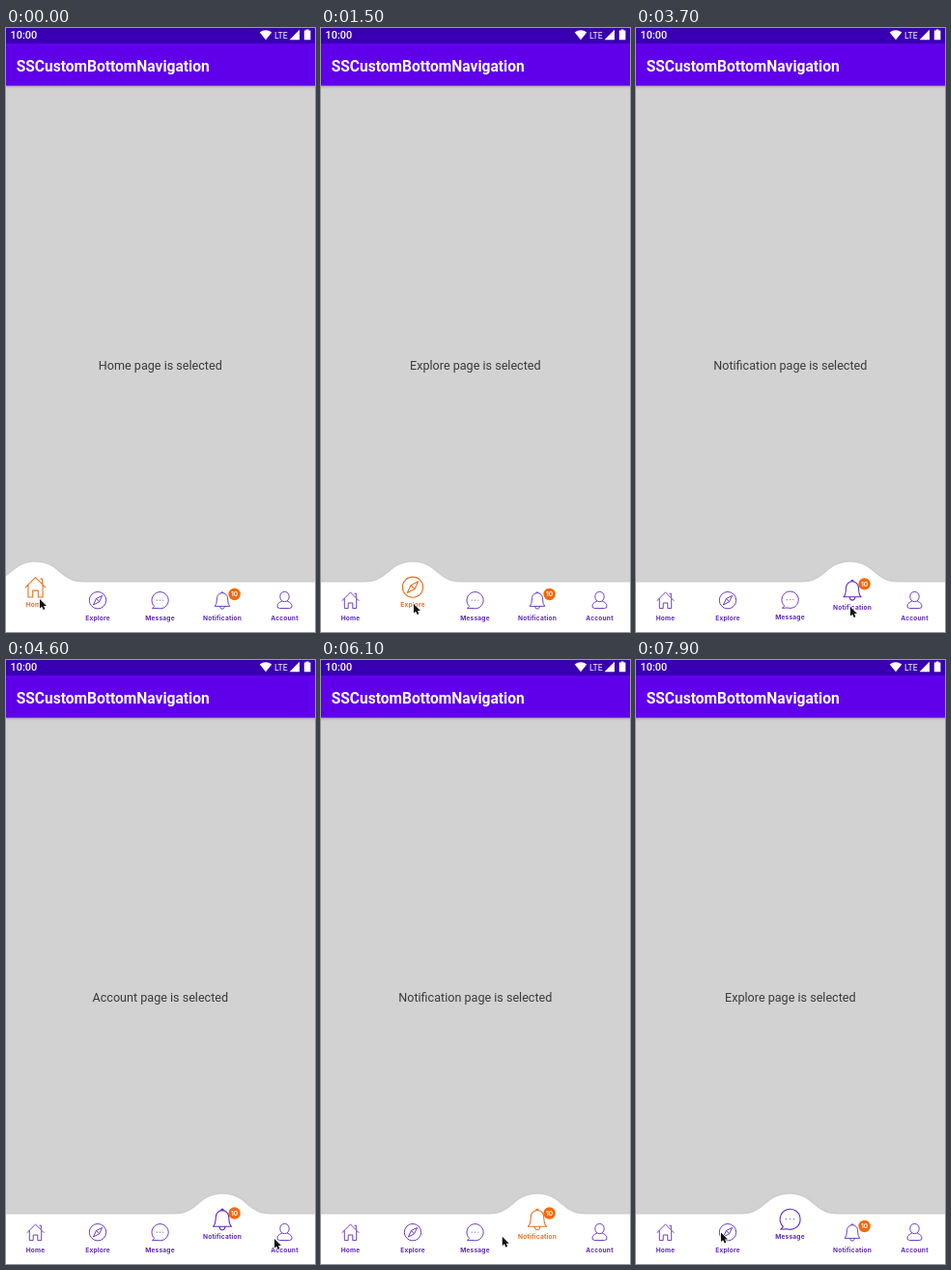
Recreate the animation shown at these times as an HTML page with a canvas. Size 320 by 624 pixels, loop 8000 ms.

```html
<!DOCTYPE html>
<html lang="en">
<head>
<meta charset="utf-8">
<title>Bottom navigation</title>
<style>
  html, body { margin: 0; width: 320px; height: 624px; overflow: hidden; }
  canvas { display: block; }
</style>
</head>
<body>
<canvas id="stage" width="320" height="624"></canvas>
<script>
const ctx = document.getElementById('stage').getContext('2d');
const LOOP = 8000, STEP = 100;
const PURPLE = '#5d2abf', ORANGE = '#ea7020';
const NAV_TOP = 572.6, WAVE_HEIGHT = 20.8, WAVE_HALF = 50, LIFT = 13.5;

// Icons are drawn around their centre
const cells = [
  { name: 'Home', icon: 'M-8.8 .6L0-8.2 8.8 .6M4-7H5.8V-2.6M-6.2-1.8V8.4H-2.3V2.8H2.3V8.4H6.2V-1.8' },
  { name: 'Explore', icon: 'M8.7 0A8.7 8.7 0 1 1-8.7 0A8.7 8.7 0 1 1 8.7 0M4.6-4.8L1.6 1.6-4.6 4.8-1.6-1.6ZM-1.6-1.6L1.6 1.6' },
  { name: 'Message', icon: 'M-5.8 6.3A8.6 8.6 0 1 1-2.6 8.2L-8 8.6ZM-3.7 0h.9M-.4 0h.9M2.9 0h.9' },
  { name: 'Notification', icon: 'M-7.8 6.2Q-5.6 4.2-5.6-1.2C-5.6-9.6 5.6-9.6 5.6-1.2Q5.6 4.2 7.8 6.2ZM-1.2-7.5Q0-10 1.2-7.5M-2.4 6.4Q-2 9 0 9T2.4 6.4' },
  { name: 'Account', icon: 'M-4.7-3.8C-4.7-10.4 4.7-10.4 4.7-3.8C4.7 3.2-4.7 3.2-4.7-3.8M-2.6 .8C-6 2.4-7.5 3.6-7.5 6Q-7.5 8.3-5 8.3H5Q7.5 8.3 7.5 6C7.5 3.6 6 2.4 2.6 .8' },
].map((cell, i) => ({ ...cell, x: 30.5 + 64.5 * i, path: new Path2D(cell.icon) }));

// [time, selected cell]
const clicks = [[-1000, 0], [990, 1], [2380, 2], [3510, 3], [4590, 4], [5590, 3], [6845, 2], [7885, 1]];

// [start, end, x, y] of each pointer move
const moves = [
  [-1, 0, 35, 590], [200, 800, 96, 595], [1600, 2200, 158, 595], [2800, 3300, 222, 598],
  [3800, 4300, 278, 598], [4900, 5300, 231, 597.5], [5800, 6600, 160, 594.5], [7100, 7800, 88, 591.5],
];

const arrow = new Path2D('M0 0V9.6L2.2 7.7 3.7 11 5.4 10.2 4 7H7Z');
const clamp = v => Math.min(1, Math.max(0, v));
const mix = (a, b, p) => a + (b - a) * p;

// cubic-bezier(.4, 0, .2, 1), solved by bisection
function ease(v) {
  const x = clamp(v);
  let lo = 0, hi = 1;
  for (let i = 0; i < 20; i++) {
    const s = (lo + hi) / 2, r = 1 - s;
    if (1.2 * s * r * r + .6 * s * s * r + s ** 3 < x) lo = s; else hi = s;
  }
  return lo * lo * (3 - 2 * lo);
}

function text(str, x, y, font, color, align = 'center', spacing = 0) {
  ctx.font = font;
  ctx.letterSpacing = `${spacing}px`;
  ctx.fillStyle = color;
  ctx.textAlign = align;
  ctx.fillText(str, x, y);
}

function fill(color, path) {
  ctx.fillStyle = color;
  ctx.fill(new Path2D(path));
}

function drawHeader() {
  const shade = ctx.createLinearGradient(0, 59.5, 0, 63);
  shade.addColorStop(0, 'rgba(0,0,0,.17)');
  shade.addColorStop(1, 'rgba(0,0,0,0)');
  ctx.fillStyle = shade;
  ctx.fillRect(0, 59, 320, 4);
  ctx.fillStyle = '#6000ea';
  ctx.fillRect(0, 15, 320, 44.6);
  ctx.fillStyle = '#3800b2';
  ctx.fillRect(0, 0, 320, 15.9);
  text('10:00', 4.5, 11.3, '500 10.9px Roboto, sans-serif', '#fff', 'left');
  text('LTE', 278, 11.2, '8.7px Roboto, sans-serif', '#fff', 'left');
  fill('#fff', 'M269 12.3L262.7 4.5Q269-.1 275.3 4.5Z');
  fill('#fff', 'M293.5 12.2H304V1.8Z');
  fill('#fff', 'M308.8 2.6H310.7V1.4H313.5V2.6H315.4V12.3H308.8Z');
  text('SSCustomBottomNavigation', 10.7, 44.6, '700 15.57px Roboto, sans-serif', '#fff', 'left');
}

function drawWave(x) {
  const l = x - WAVE_HALF, r = x + WAVE_HALF, h = WAVE_HALF / 2, top = NAV_TOP - WAVE_HEIGHT;
  ctx.save();
  ctx.shadowColor = 'rgba(140,140,140,.25)';
  ctx.shadowBlur = 3;
  fill('#fff', `M-60 ${NAV_TOP}H${l}C${l + h} ${NAV_TOP} ${x - h} ${top} ${x} ${top}
    C${x + h} ${top} ${r - h} ${NAV_TOP} ${r} ${NAV_TOP}H380V640H-60Z`);
  ctx.restore();
}

function drawCell(cell, progress) {
  const rise = LIFT * progress, size = 1 + .22 * progress;
  const color = progress === 1 ? ORANGE : PURPLE;
  ctx.save();
  ctx.translate(cell.x, 591.2 - rise);
  ctx.scale(size, size);
  ctx.strokeStyle = color;
  ctx.lineWidth = .9;
  ctx.lineJoin = 'round';
  ctx.stroke(cell.path);
  ctx.restore();
  text(cell.name, cell.x, 611.8 - rise, '700 6.6px Inter, sans-serif', color, 'center', .18);
  if (cell.name === 'Notification') {
    ctx.fillStyle = '#f16a0c';
    ctx.beginPath();
    ctx.arc(236.6, 585 - rise, 6.2, 0, 7);
    ctx.fill();
    text('10', 236.6, 587.3 - rise, '600 6.6px Inter, sans-serif', '#fff');
  }
}

function drawPointer(t) {
  const i = moves.findLastIndex(m => m[0] <= t);
  const [start, end, x, y] = moves[i];
  const from = moves[Math.max(0, i - 1)];
  const p = 1 - (1 - clamp((t - start) / (end - start))) ** 2;
  ctx.save();
  ctx.translate(mix(from[2], x, p), mix(from[3], y, p));
  ctx.strokeStyle = '#fff';
  ctx.lineWidth = 1.3;
  ctx.stroke(arrow);
  ctx.fillStyle = '#111';
  ctx.fill(arrow);
  ctx.restore();
}

function draw(t) {
  const k = clicks.findLastIndex(c => c[0] <= t);
  const [start, current] = clicks[k];
  const previous = clicks[Math.max(0, k - 1)][1];
  const elapsed = t - start;
  const shift = ease(elapsed / 250);
  const rise = elapsed >= 312.5 ? 1 : Math.min(.999, ease((elapsed - 62.5) / 250));

  ctx.fillStyle = '#d2d2d2';
  ctx.fillRect(0, 0, 320, 624);
  drawHeader();
  text(`${cells[current].name} page is selected`, 159.8, 353.4, '12.6px Roboto, sans-serif', '#3a3a3a');
  drawWave(mix(cells[previous].x, cells[current].x, shift));
  cells.forEach((cell, i) => {
    const falling = i === previous ? Math.min(.999, 1 - shift) : 0;
    drawCell(cell, i === current ? rise : falling);
  });
  drawPointer(t);
}

function tick() {
  draw(Math.floor(performance.now() % LOOP / STEP) * STEP);
  requestAnimationFrame(tick);
}
tick();
</script>
</body>
</html>
```
